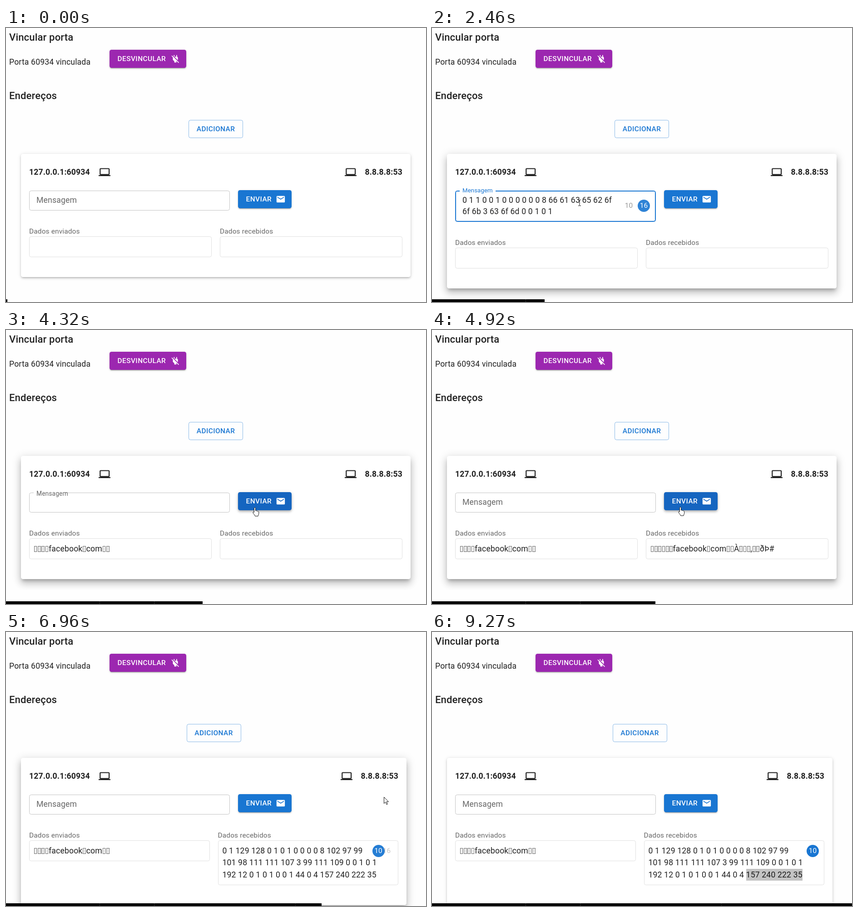
These frames come from a looping animation (925x605 px, 9.3 s). An HTML page:

```html
<!DOCTYPE html>
<html lang="pt-BR">
<head>
<meta charset="utf-8">
<title>Vincular porta</title>
<style>
html, body { margin: 0; width: 100%; height: 100%; overflow: hidden; background: #fefefe; }
#stage {
  --sb: 0px; --grow: 0px; --tall: 0px; --lift: 0; --float: 0;
  position: relative; width: 925px; height: 605px; overflow: hidden; background: #fefefe;
  font: 400 17.6px/26.4px Roboto, sans-serif; letter-spacing: .165px; color: rgba(0,0,0,.87);
}
#stage div, #stage svg { position: absolute; box-sizing: border-box; }
.t { white-space: pre; margin-top: -13.2px; }
.h { font-size: 22px; font-weight: 500; }
.bold { font-weight: 700; }
.small { font-size: 15.4px; color: rgba(0,0,0,.6); }
.btn {
  height: 40.2px; border-radius: 4.4px; color: #fff; padding-left: 17.6px;
  font-size: 15.4px; font-weight: 500; line-height: 40px; letter-spacing: .44px; white-space: pre;
  box-shadow: 0 3px 1px -2px rgba(0,0,0,.2), 0 2px 2px rgba(0,0,0,.14), 0 1px 5px rgba(0,0,0,.12);
}
.btn svg { width: 22px; height: 22px; right: 13.2px; top: 9px; fill: #fff; }
#add {
  left: calc(402px - var(--sb) / 2); top: 203px; width: 120px; padding: 0; text-align: center; line-height: 38px;
  color: #1976d2; border: 1px solid rgba(25,118,210,.5); box-shadow: none;
}
#card {
  left: 33px; top: 278px; width: calc(858px - var(--sb)); height: calc(272px + var(--grow) + var(--tall));
  background: #fff; border-radius: 4.4px;
  box-shadow:
    0 calc(3px + 3px * var(--lift)) calc(3px + 3px * var(--lift)) -2.5px rgba(0,0,0,.2),
    0 calc(2.5px + 8px * var(--lift)) calc(4px + 11px * var(--lift)) calc(1px * var(--lift)) rgba(0,0,0,.14),
    0 calc(1px + 3px * var(--lift)) calc(8px + 11px * var(--lift)) calc(3px * var(--lift)) rgba(0,0,0,.12);
}
.lap { width: 26.4px; height: 26.4px; top: 26.8px; fill: rgba(0,0,0,.87); }
#field { left: 18px; top: 80.5px; width: 442px; height: calc(44px + var(--grow)); border: 1px solid #c4c4c4; border-radius: 4.4px; }
#notch { left: 27.5px; top: 79px; height: 4px; width: calc(79px * var(--float)); background: #fff; }
#label {
  left: 34px; top: calc(102.5px - 22.3px * var(--float)); color: rgba(0,0,0,.6);
  transform: scale(calc(1 - .25 * var(--float))); transform-origin: 0 50%;
}
#msg { left: 34px; top: 89.8px; width: 345px; line-height: 25.3px; }
#low { left: 0; right: 0; top: var(--grow); height: 240px; }
.box {
  top: 182px; width: calc(402px - var(--sb) / 2); height: 46px; padding: 8.9px; border: 1px solid #e0e0e0;
  border-radius: 4.4px; white-space: pre;
}
#sent { left: 18px; }
#recv { right: 18px; height: calc(46px + var(--tall)); }
i { display: inline-block; width: 6.7px; height: 12.5px; margin: 0 .8px; box-sizing: border-box; vertical-align: -1px;
  border: 1px solid #6a6a6a; background: linear-gradient(90deg, transparent 40%, #bbb 40% 60%, transparent 60%); }
mark { background: #c3c3c3; color: inherit; padding: 3px 0; }
.dot { width: 27px; height: 27px; margin: -13.5px; border-radius: 50%; text-align: center;
  font-size: 15.4px; line-height: 27px; letter-spacing: 0; }
#bar { left: 0; top: 599px; height: 6px; background: #000; overflow: hidden; }
#bar::before { content: ""; position: absolute; left: 206px; top: 0; width: 1px; height: 6px;
  background: #333; box-shadow: 120px 0 #333, 431px 0 #222; }
#cursor { left: 0; top: 0; overflow: visible; width: 20px; height: 24px; }
#cursor path { fill: #fff; stroke: #111; stroke-width: 1; }
#cursor .beam { fill: none; }
</style>
</head>
<body>
<div id="stage">
  <div class="t h" style="left:7px;top:21.5px">Vincular porta</div>
  <div class="t" style="left:7px;top:75px">Porta 60934 vinculada</div>
  <div class="btn" style="left:228px;top:48px;width:169px;background:#9c27b0">DESVINCULAR<svg viewBox="0 0 24 24"><path d="M18 14.49V9c0-1-1.01-2.01-2-2V3h-2v4h-4V3H8v2.48l9.51 9.5.49-.49zm-1.76 1.77L7.2 7.2l-.01.01L3.98 4 2.71 5.25l3.36 3.36C6.04 8.74 6 8.87 6 9v5.48L9.5 18v3h5v-3l.48-.48L19.45 22l1.26-1.28-4.47-4.46z"/></svg></div>
  <div class="t h" style="left:7px;top:150.5px">Endereços</div>
  <div class="btn" id="add">ADICIONAR</div>

  <div id="card">
    <div class="t bold" style="left:18px;top:40px">127.0.0.1:60934</div>
    <svg class="lap" style="left:170.5px" viewBox="0 0 24 24"><path id="laptop" d="M20 18c1.1 0 1.99-.9 1.99-2L22 6c0-1.1-.9-2-2-2H4c-1.1 0-2 .9-2 2v10c0 1.1.9 2 2 2H0v2h24v-2h-4zM4 6h16v10H4V6z"/></svg>
    <svg class="lap" style="right:118.8px" viewBox="0 0 24 24"><use href="#laptop"/></svg>
    <div class="t bold" style="right:18px;top:40px">8.8.8.8:53</div>

    <div id="field"></div>
    <div id="notch"></div>
    <div class="t" id="label">Mensagem</div>
    <div id="msg"></div>
    <div class="dot" id="m10">10</div>
    <div class="dot" id="m16">16</div>
    <div class="btn" id="send" style="left:478px;top:80px;width:118px">ENVIAR<svg viewBox="0 0 24 24"><path d="M20 4H4c-1.1 0-1.99.9-1.99 2L2 18c0 1.1.9 2 2 2h16c1.1 0 2-.9 2-2V6c0-1.1-.9-2-2-2zm0 4l-8 5-8-5V6l8 5 8-5v2z"/></svg></div>

    <div id="low">
      <div class="t small" style="left:18px;top:171px">Dados enviados</div>
      <div class="t small" style="left:calc(438px - var(--sb) / 2);top:171px">Dados recebidos</div>
      <div class="box" id="sent"></div>
      <div class="box" id="recv"></div>
      <div class="dot" id="r10">10</div>
      <div class="dot" id="r16">16</div>
    </div>
  </div>

  <svg id="cursor">
    <path class="arrow" d="M.5.5v14.2l3.3-3.1 2.4 5.4 2.2-1-2.4-5.2h4.5z"/>
    <path class="hand" transform="translate(-5 -1)" d="M5 1c1.2 0 1.6.8 1.6 1.8V8c1.2-.6 2 0 2.4.7 1-.5 2 0 2.4.9 1.2-.4 2.3.3 2.3 1.6v3.3c0 2-1.4 3-1.6 5.5H5.6C5 17.6 2 14.8.9 12.4.4 11 2 10.2 3.4 11.6V2.8C3.4 1.8 3.8 1 5 1z"/>
    <path class="beam" d="M-3-6.5h2.5M.5-6.5H3M0-6.5v13M-3 6.5h2.5M.5 6.5H3"/>
  </svg>
  <div id="bar"></div>
</div>

<script>
const LOOP = 9300, STEP = 30;
const PASTE = 1980, AS_TEXT = 2950, SEND = 4300, REPLY = 4380, DECIMAL = 6560, DRAG = 7850;
const $ = id => document.getElementById(id);
const stage = $('stage');

const hex = '0 1 1 0 0 1 0 0 0 0 0 0 8 66 61 63 65 62 6f 6f 6b 3 63 6f 6d 0 0 1 0 1';
const query = '□□□□facebook□com□□';
const reply = '□□□□□□facebook□com□□À□□□,□□ðÞ#';
const decimal = '0 1 129 128 0 1 0 1 0 0 0 0 8 102 97 99\n101 98 111 111 107 3 99 111 109 0 0 1 0 1\n192 12 0 1 0 1 0 0 1 44 0 4 ';
const ip = '157 240 222 35';

// time, x, y of the pointer's hot spot
const path = [
  [400, 640, 612], [600, 610, 490], [800, 570, 385], [1000, 480, 385], [1130, 466, 382],
  [1250, 464, 382], [1380, 390, 404], [1550, 300, 388], [1700, 280, 384], [2300, 280, 384],
  [2800, 466, 392], [3150, 466, 390], [3540, 510, 478], [3800, 560, 470], [4150, 548, 392],
  [5150, 547, 391], [5600, 848, 484], [5900, 848, 485], [6200, 817, 484], [6600, 817, 485],
  [6750, 812, 488], [7050, 838, 330], [7600, 690, 537], [7830, 697, 537], [8450, 855, 537],
  [8650, 850, 545], [8850, 858, 615]
];
const shapes = [
  [0, 'arrow'], [800, 'hand'], [950, 'beam'], [1090, 'hand'], [1290, 'arrow'], [1480, 'beam'],
  [2720, 'hand'], [3230, 'arrow'], [4070, 'hand'], [5190, 'arrow'], [5480, 'hand'],
  [6790, 'arrow'], [7380, 'beam'], [8640, 'arrow']
];

const clamp = (v, a = 0, b = 1) => Math.min(b, Math.max(a, v));
const ramp = (t, start, span = 250) => clamp((t - start) / span);
const pulse = (t, a, b, span) => ramp(t, a, span) - ramp(t, b, span);
const within = (t, a, b) => t >= a && t < b;
const setVar = (name, value) => stage.style.setProperty('--' + name, value);

function pointer(t) {
  const n = path.findIndex(p => p[0] > t);
  if (n === 0) return path[0].slice(1);
  if (n < 0) return path[path.length - 1].slice(1);
  const [t0, x0, y0] = path[n - 1], [t1, x1, y1] = path[n];
  const u = (t - t0) / (t1 - t0), e = u * u * (3 - 2 * u);
  return [x0 + (x1 - x0) * e, y0 + (y1 - y0) * e];
}

function write(el, text) {
  if (el.dataset.text === text) return;
  el.dataset.text = text;
  el.innerHTML = text.replace(/□/g, '<i></i>');
}

function dot(id, x, y, opacity, chosen, hover) {
  Object.assign($(id).style, {
    left: x + 'px', top: y + 'px', opacity,
    color: chosen ? '#fff' : '#999',
    background: chosen ? '#1976d2' : hover ? 'rgba(0,0,0,.06)' : 'transparent'
  });
}

function render(t) {
  const wide = t < DECIMAL, pasted = within(t, PASTE, AS_TEXT), focus = within(t, 1600, AS_TEXT);
  const shift = wide ? 0 : 9;
  setVar('sb', shift + 'px');
  setVar('grow', pasted ? '25.3px' : '0px');
  setVar('tall', wide ? '0px' : '52.8px');
  setVar('lift', pulse(t, 480, 8730, 300));
  setVar('float', pulse(t, 1600, SEND, 150));

  const onMsg = pulse(t, 990, 3310);
  const border = focus ? '#1976d2' : within(t, 990, 3310) ? '#212121' : '#c4c4c4';
  $('field').style.borderColor = border;
  $('field').style.boxShadow = focus ? 'inset 0 0 0 1px #1976d2' : 'none';
  $('label').style.color = focus ? '#1976d2' : '';
  write($('msg'), pasted ? hex : within(t, AS_TEXT, SEND) ? query : '');
  const my = pasted ? 114.9 : 102;
  dot('m10', 400.5, my, onMsg, false, false);
  dot('m16', 433.5, my, onMsg * (within(t, 1180, AS_TEXT) ? .9 : 1), within(t, 1180, AS_TEXT), within(t, 1090, 3230));

  const hot = pulse(t, 830, 980, 120) + pulse(t, 4080, 5190, 200);
  const mix = (a, b) => Math.round(a + (b - a) * hot);
  $('send').style.background = `rgb(${mix(25, 21)},${mix(118, 101)},${mix(210, 192)})`;
  $('send').style.boxShadow = hot > .5
    ? '0 2px 4px -1px rgba(0,0,0,.2), 0 4px 5px rgba(0,0,0,.14), 0 1px 10px rgba(0,0,0,.12)' : '';

  const [x, y] = pointer(t);
  write($('sent'), t >= SEND ? query : '');
  if (wide) write($('recv'), t >= REPLY ? reply : '');
  else {
    const n = t > DRAG ? clamp(Math.round((x - 692) / 8.95), 0, ip.length) : 0;
    write($('recv'), decimal + (n ? `<mark>${ip.slice(0, n)}</mark>` : '') + ip.slice(n));
  }
  const onRecv = pulse(t, 500, 700) + pulse(t, 3518, 3900) + pulse(t, 5350, 6850) + pulse(t, 7350, 8690);
  const x16 = 814.5 - shift;
  dot('r10', wide ? x16 - 32.5 : x16 - 32.8 * onRecv, 205.7, wide ? onRecv : 1 - .1 * onRecv, !wide, within(t, 6100, DECIMAL));
  dot('r16', x16, 205.7, onRecv, false, within(t, 5480, 6050));

  const shape = shapes.filter(s => s[0] <= t).pop()[1];
  for (const p of $('cursor').children) p.style.display = p.classList.contains(shape) ? '' : 'none';
  $('cursor').style.transform = `translate(${Math.round(x)}px,${Math.round(y)}px)`;
  $('bar').style.width = 925 * (t + STEP) / LOOP + 'px';
}

const begin = performance.now();
function tick() {
  const t = (performance.now() - begin) % LOOP;
  render(Math.floor(t / STEP) * STEP);
  requestAnimationFrame(tick);
}
tick();
</script>
</body>
</html>
```
